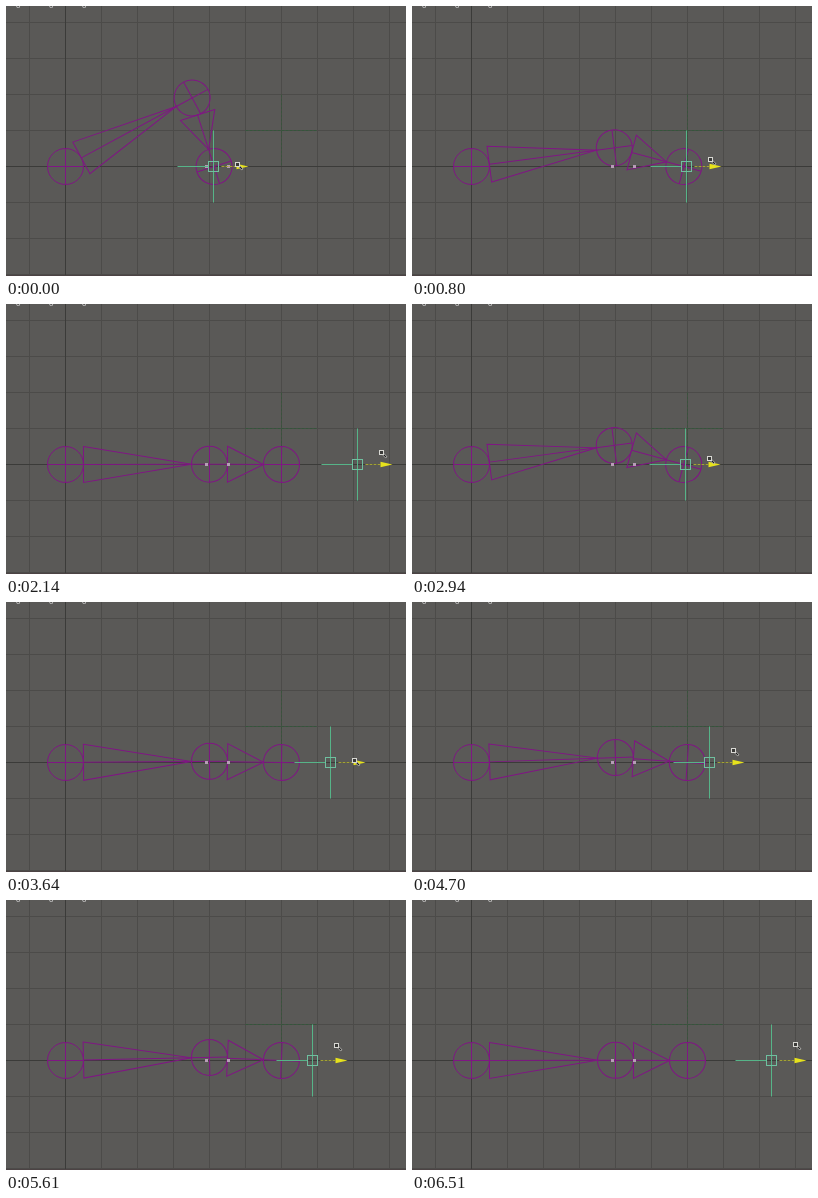
Animation, 400 px wide and 270 px high, one loop 6650 ms. Source, as an HTML page with a canvas:

```html
<!DOCTYPE html>
<html lang="en">
<head>
<meta charset="utf-8">
<title>Soft IK</title>
<style>
html, body { margin: 0; height: 100%; overflow: hidden; background: #5a5957; }
canvas { display: block; }
</style>
</head>
<body>
<canvas id="stage" width="400" height="270"></canvas>
<script>
const ctx = document.getElementById('stage').getContext('2d');
const LOOP = 6650, CELL = 36, RADIUS = CELL / 2;
const UPPER = 4 * CELL, LOWER = 2 * CELL, SOFTNESS = CELL / 4;
const ROOT = { x: 59.5, y: 160.5 };
const PURPLE = '#7f1683', GREEN = '#56b488', YELLOW = '#e6e21c';

// [time, position] at the turns of the drag and midway between them
const drag = [
  [0, 207.5], [800, 274], [2140, 351], [2280, 359], [3060, 268], [3640, 324],
  [4080, 371], [4700, 298], [5130, 244], [5610, 306.5], [6240, 356], [LOOP, 359.5]
];
const pointerHeight = [[0, 160], [2140, 149], [3640, 160], [4700, 150], [LOOP, 145]];

const slope = (a, b) => (b[1] - a[1]) / (b[0] - a[0]);

function tangent(keys, i) {
  if (i === 0) return slope(keys[0], keys[1]);
  if (i === keys.length - 1) return 0;
  const before = slope(keys[i - 1], keys[i]);
  const after = slope(keys[i], keys[i + 1]);
  return before * after > 0 ? 2 * before * after / (before + after) : 0;
}

// Monotone cubic interpolation
function sample(keys, t) {
  const i = keys.findIndex((key, n) => n > 0 && t <= key[0]) - 1;
  const [t0, v0] = keys[i], [t1, v1] = keys[i + 1];
  const span = t1 - t0, u = (t - t0) / span, w = 1 - u;
  return v0 * w * w * (1 + 2 * u) + v1 * u * u * (3 - 2 * u)
    + span * u * w * (w * tangent(keys, i) - u * tangent(keys, i + 1));
}

function line(color, x1, y1, x2, y2, dash = [], width = 1) {
  ctx.strokeStyle = color;
  ctx.lineWidth = width;
  ctx.setLineDash(dash);
  ctx.beginPath();
  ctx.moveTo(x1, y1);
  ctx.lineTo(x2, y2);
  ctx.stroke();
  ctx.setLineDash([]);
}

function triangle(x, halfHeight, tip) {
  ctx.beginPath();
  ctx.moveTo(x, -halfHeight);
  ctx.lineTo(tip, 0);
  ctx.lineTo(x, halfHeight);
  ctx.closePath();
}

function at(point, angle, draw) {
  ctx.save();
  ctx.translate(point.x, point.y);
  ctx.rotate(angle);
  draw();
  ctx.restore();
}

function drawGrid() {
  ctx.fillStyle = '#5a5957';
  ctx.fillRect(0, 0, 400, 270);
  for (let x = ROOT.x - CELL; x < 400; x += CELL) line('#4c4b49', x, 0, x, 270);
  for (let y = ROOT.y - 4 * CELL; y < 270; y += CELL) line('#4c4b49', 0, y, 400, y);
  line('#3b3b39', ROOT.x, 0, ROOT.x, 270);
  line('#3b3b39', 0, ROOT.y, 400, ROOT.y);
  line('#4c4344', 0, 269.5, 400, 269.5);
  ctx.fillStyle = '#ddd';
  ctx.font = '8px "Liberation Sans", sans-serif';
  for (let i = 0; i < 3; i++) ctx.fillText('0', 10 + 33 * i, 2);

  const restX = ROOT.x + UPPER + LOWER, topY = ROOT.y - CELL;
  line('#35553b', restX - CELL, topY, restX + CELL, topY, [3, 1]);
  line('#3a523d', restX, topY - CELL, restX, ROOT.y, [3, 1]);
}

function drawJoint(point, angle) {
  at(point, angle, () => {
    line(PURPLE, -RADIUS, 0, RADIUS, 0);
    line(PURPLE, 0, -RADIUS, 0, RADIUS);
    ctx.beginPath();
    ctx.arc(0, 0, RADIUS, 0, Math.PI * 2);
    ctx.stroke();
  });
}

function drawBone(point, angle, length) {
  at(point, angle, () => {
    line(PURPLE, RADIUS, 0, length - RADIUS, 0);
    triangle(RADIUS, RADIUS, length - RADIUS);
    ctx.stroke();
  });
}

function drawArm(reach) {
  const limit = UPPER + LOWER, start = limit - SOFTNESS;
  const d = reach < start ? reach
    : limit - SOFTNESS * Math.exp((start - reach) / SOFTNESS);
  const along = (UPPER ** 2 - LOWER ** 2 + d * d) / (2 * d);
  const rise = Math.sqrt(Math.max(0, UPPER ** 2 - along ** 2));
  const elbow = { x: ROOT.x + along, y: ROOT.y - rise };
  const end = { x: ROOT.x + d, y: ROOT.y };
  const upperAngle = Math.atan2(-rise, along);
  const lowerAngle = Math.atan2(rise, d - along);
  drawJoint(ROOT, 0);
  drawBone(ROOT, upperAngle, UPPER);
  drawJoint(elbow, upperAngle);
  drawBone(elbow, lowerAngle, LOWER);
  drawJoint(end, lowerAngle);
}

function drawHandle(x) {
  at({ x: Math.floor(x) + 0.5, y: ROOT.y }, 0, () => {
    line(GREEN, -CELL, 0, -5, 0);
    line(GREEN, 0, -CELL, 0, CELL);
    line('#a3a235', 8, 0, 24, 0, [3, 1]);
    ctx.strokeStyle = '#6fbf9f';
    ctx.strokeRect(-5, -5, 10, 10);
    ctx.fillStyle = YELLOW;
    triangle(23, 2.7, 35);
    ctx.fill();
  });
}

function drawPointer(x, y) {
  at({ x: Math.floor(x) + 0.5, y: Math.floor(y) + 0.5 }, 0, () => {
    line('#c9c9c4', 0, 0, 4, 4, [], 2.4);
    line('#1c1c1c', 0, 0, 3.6, 3.6, [], 1.2);
    ctx.fillStyle = '#3a3a38';
    ctx.fillRect(-3, -3, 4, 4);
    ctx.strokeStyle = '#d8d8d3';
    ctx.lineWidth = 1;
    ctx.strokeRect(-3, -3, 4, 4);
  });
}

function frame() {
  const t = performance.now() % LOOP;
  const x = sample(drag, t);
  drawGrid();
  drawArm(x + 0.5 - ROOT.x);
  ctx.fillStyle = '#b79db7';
  for (const dot of [199, 221]) ctx.fillRect(dot, 159, 3, 3);
  drawHandle(x);
  drawPointer(x + 25, sample(pointerHeight, t));
  requestAnimationFrame(frame);
}
frame();
</script>
</body>
</html>
```
